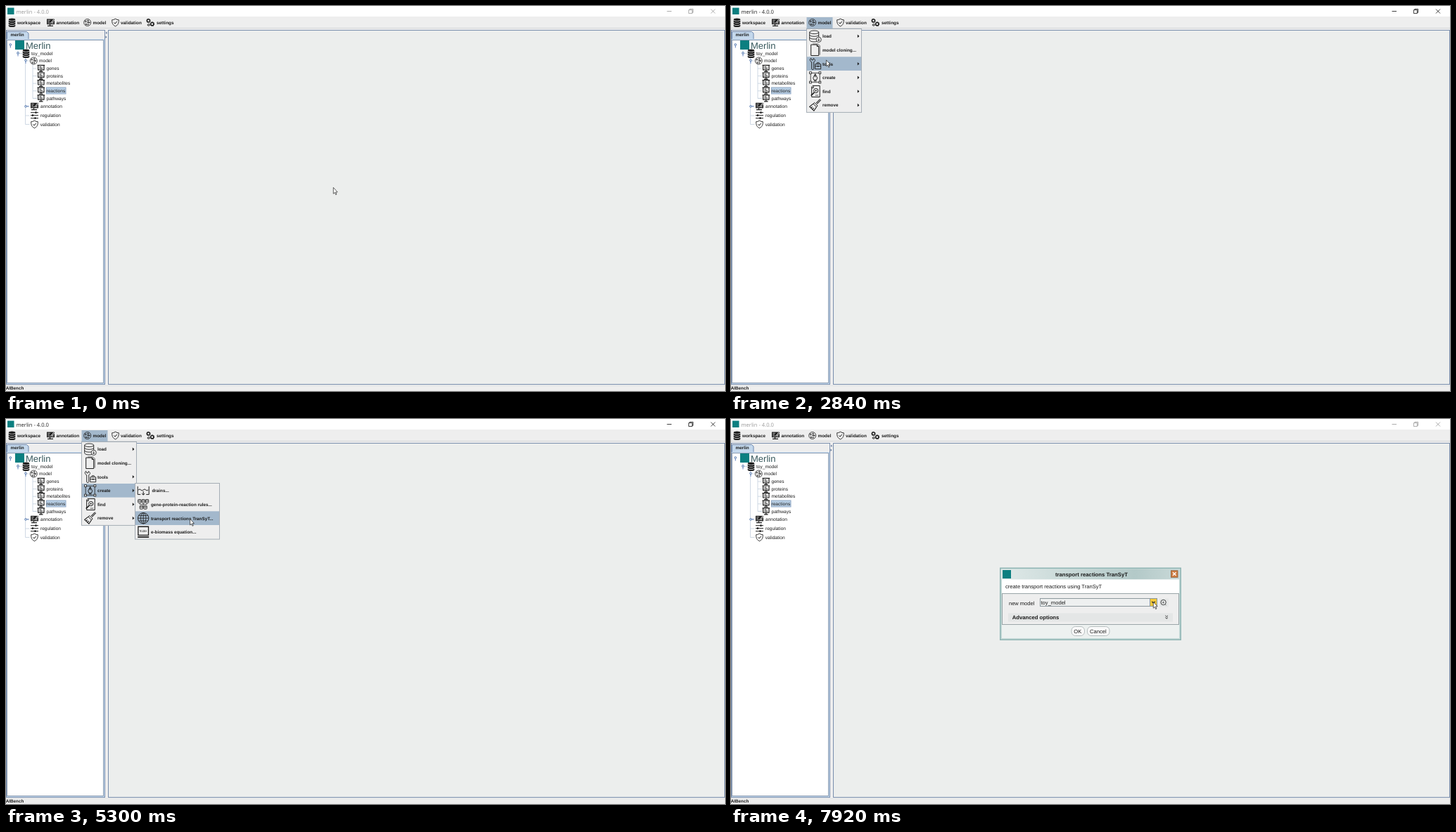
An HTML page that plays this animation: 1022x548 px, repeating every 8000 ms.

```html
<!DOCTYPE html>
<html lang="en">
<head>
<meta charset="utf-8">
<title>Model menu</title>
<style>
html, body { margin: 0; width: 100%; height: 100%; overflow: hidden; background: #eceeed; }
svg { display: block; width: 100%; height: 100%; }
text { font-family: "Liberation Sans", Arial, sans-serif; text-rendering: geometricPrecision; white-space: pre; }
</style>
</head>
<body>
<svg id="stage" viewBox="0 0 1022 548" xmlns="http://www.w3.org/2000/svg"></svg>
<script>
const LOOP = 8000, TEAL = '#0b7f80', PICK = '#a3b8cc', INK = '#1c1c1c', EDGE = '#7a8fae';
const stage = document.getElementById('stage');

// Markup helpers
const rect = (x, y, w, h, fill, extra = '') =>
  `<rect x="${x}" y="${y}" width="${w}" height="${h}" fill="${fill}" ${extra}/>`;
const frame = (x, y, w, h, fill, line) =>
  rect(x + .5, y + .5, w - 1, h - 1, fill, `stroke="${line}"`);
const path = (d, stroke = INK, w = 1, fill = 'none') =>
  `<path d="${d}" stroke="${stroke}" stroke-width="${w}" fill="${fill}"/>`;
const dot = (x, y, r, fill = INK, extra = '') =>
  `<circle cx="${x}" cy="${y}" r="${r}" fill="${fill}" ${extra}/>`;
const ring = (x, y, r, w = 1) => dot(x, y, r, 'none', `stroke="${INK}" stroke-width="${w}"`);
const text = (x, y, s, size, bold, fill = INK) =>
  `<text x="${x}" y="${y}" font-size="${size}" fill="${fill}"${bold ? ' font-weight="700"' : ''}>${s}</text>`;
const group = (id, body) => `<g id="${id}">${body}</g>`;
const at = (x, y, body, s = 1) => `<g transform="translate(${x} ${y}) scale(${s})">${body}</g>`;

// Icons, each centred on 0,0
const disc = y => path(`M-4.8 ${y}v2.2c0 2 9.6 2 9.6 0v-2.2c0 1.8-9.6 1.8-9.6 0z`, 'none', 0, INK);
const gear = (x, y, r) => ring(x, y, r, r * .7) +
  dot(x, y, r * 1.3, 'none', `stroke="${INK}" stroke-width="${r * .6}" stroke-dasharray="${r * .5}"`);
const icon = {
  base: `<ellipse cy="-4.3" rx="4.8" ry="1.7" fill="${INK}"/>` + disc(-3.3) + disc(-.2) + disc(2.9),
  notes: rect(-5.5, -5, 11, 7.6, INK) + path('M-4.5-3.2h4M-4.5-1.3h3M-4.5 .8h5M1.5 .8h3', '#c8c8c8', .8) +
    path('M-1 2.5v2M-4.5 4.8h8', INK, 1.2) + path('M5.5-4.5L.8 .8', '#eee', 2.1) + path('M5.5-4.5L.8 .8', INK, .9),
  net: ring(0, 0, 5, .8) + path('M-3-2L1-3 3 0 1 3-2 3-3-2 1 0 3 0M1-3L1 0-2 3', INK, .5) +
    [[-3, -2], [1, -3], [3, 0], [1, 3], [-2, 3], [1, 0]].map(p => dot(p[0], p[1], .8)).join(''),
  shield: path('M0-5.3Q2.5-3.6 4.8-3.7C5 1 3.6 3.8 0 5.4-3.6 3.8-5 1-4.8-3.7-2.5-3.6 0-5.3 0-5.3z', INK, .9) +
    path('M-2 0L-.5 1.6 2.3-1.6', INK, 1),
  gears: gear(-2.5, -2.6, 2) + gear(2.8, 2.2, 2.1) + gear(-2.4, 3.4, 1.2),
  board: path('M-5.3-4.4H5.3M-4.2-4.5V2H4.2V-4.5', INK, 1.2) + path('M0 2V4M-2.8 4.6H2.8', INK, 1.3) +
    path('M-2.4-2.2H.6M-2.4-.2H2.2', INK, 1),
  sliders: path('M-5.5-4h11M-5.5 0h11M-5.5 4h11', INK, 1) + path('M2-5.4v2.8M-2.5-1.4v2.8M1 2.6v2.8', INK, 1.8),
  load: path('M-8-5.5v11c0 3.4 13 3.4 13 0v-11M-8-2c0 3.2 13 3.2 13 0M-8 1.8c0 3.2 13 3.2 13 0', INK, .9) +
    `<ellipse cx="-1.5" cy="-5.6" rx="6.5" ry="2.3" fill="none" stroke="${INK}" stroke-width=".9"/>` +
    dot(5, 5, 3.6, '#eee', `stroke="${INK}" stroke-width=".8"`) + path('M5 3v3.6M3.5 5.2L5 6.8 6.5 5.2', INK, .8),
  copy: path('M-6-7.5H2.5L5-5V8H-6zM2.5-7.5V-5H5', INK, 1) + path('M-3.5-8.5H4L6.5-6V7', INK, .7),
  tools: path('M-6-8l1.2 2.8 2-.3.2-2.2C1-6 0-3.2-2-2.6V7.2c0 1.5-3 1.5-3 0V-2.4C-8-3.5-8-7-6-8z', INK, .9) +
    path('M0 .5h8v7H0zM2.5.5v-2h3v2M0 3.5h8', INK, .9) + dot(4, 3.5, 1),
  pen: path('M-6.5-6.5h13v13h-13z', INK, .8) + path('M0-5.2L3 .5 1.8 3.5h-3.6L-3 .5zM0-5v4.4M-1.8 5h3.6', INK, 1) +
    [[-1, -1], [1, -1], [-1, 1], [1, 1]].map(p => rect(p[0] * 6.7 - 1.4, p[1] * 6.7 - 1.4, 2.8, 2.8, '#eee', `stroke="${INK}" stroke-width=".8"`)).join(''),
  find: path('M-3.5-8H6.5V8H-5V-6.4zM-5-5h2.5v-3', INK, 1) + ring(1, -1, 3.1) +
    path('M-1.4 1.6L-6 6', INK, 1.7) + path('M-.5-1h3M1-2.4v3', INK, .7) + path('M0 5.6h4.5', INK, .8),
  brush: path('M7.5-8L2-2.4', INK, 2.6) + path('M7.5-8L2-2.4', '#eee', 1) +
    path('M-1-3.6L3.4 .8 1.8 2.6-2.8-2z', INK, 1) + path('M-2.8-2L-8 2.2-1.8 8 1.8 2.6M-6 4l2-1.6M-4 6l2-2', INK, 1.1),
  globe: ring(0, 0, 7.7, .9) + `<ellipse rx="3.7" ry="7.7" fill="none" stroke="${INK}" stroke-width=".8"/>` +
    path('M0-7.7V7.7M-7.7 0H7.7M-6.6-3.8H6.6M-6.6 3.8H6.6', INK, .8),
  drains: path('M-8-6V5.5H-4M8-6V5.5H4', INK, 1) + path('M-7-1q2-2 3.5 0t3.5 0 3.5 0 3.5 0M0 1v5M-2 4L0 6.3 2 4', INK, 1),
  rules: [[-5.3, -4.5], [0, -4.5], [5.3, -4.5], [-2.8, 4.3], [2.8, 4.3]].map(p => at(p[0], p[1],
    path('M-4.8-4c0-2.2 9.6-2.2 9.6 0V4c0 2.2-9.6 2.2-9.6 0zM-4.8-4c0 2 9.6 2 9.6 0M-4.8 0c0 2 9.6 2 9.6 0', INK, 1.6), .47)).join('') +
    path('M-5-2V0H5V-2M0-2V2', INK, .6),
  formula: path('M-7.3-7.6h14.6V4.6H-7.3z', INK, 1.3) + rect(-8, 6.2, 16, 1.8, INK) + text(-5.4, .4, 'Y=X+', 4.2, true)
};

// Window
const square = (x, y, s) => rect(x, y, s, s, TEAL);
const titleBar = rect(0, 0, 1022, 15, '#fff') + square(2, 2.5, 9.5) +
  `<g id="caption"><text x="14.5" y="10.5" font-size="7.6" style="font-family:'Open Sans','Noto Sans',sans-serif">merlin - 4.0.0</text>
  <path d="M939.5 7.5h6.5M970.5 5.6h4.8v5h-4.8zM971.8 5.6v-1.3h4.8v5h-1.3M1002 4.5l6 6M1008 4.5l-6 6" fill="none" stroke="currentColor" stroke-width=".8"/></g>`;

const bar = [['workspace', 16, 8.5, 'base'], ['annotation', 71.5, 63.5, 'notes'], ['model', 123.5, 115.7, 'net'],
  ['validation', 163, 155.5, 'shield'], ['settings', 214, 205, 'gears']];
const menuBar = rect(0, 15, 1022, 16.5, '#eee') + rect(0, 31, 1022, 1, '#d2d5d7') +
  group('modelHot', rect(107.5, 16, 37, 16, PICK)) +
  bar.map(([s, x, ix, k]) => at(ix, 23.5, icon[k]) + text(x, 25.9, s, 6.4, true)).join('');

const row = (s, x, y, ix, k) => at(ix, y, icon[k]) + text(x, y + 2.3, s, 6.6);
const handle = (x, y, open) => path(open ? `M${x} ${y + 1}v3.5` : `M${x + 1} ${y}h3.5`, '#6382bf', 1) +
  dot(x, y, 1.4, '#dfe9f5', 'stroke="#4f72a8" stroke-width=".8"');
const kids = ['genes', 'proteins', 'metabolites', 'reactions', 'pathways'];
const tree = rect(1, 47, 139, 491, '#c8ddf2') + frame(1, 48, 138, 489, '#fff', '#8a9bb0') +
  path('M1.5 47V36.5H29.5L32 39V47', '#7189ae', 1, '#c4d8ec') + text(6.5, 43.2, 'merlin', 6.4, true) +
  path('M17 60v7.5h6M27.5 73v95.5h6M38 83v48.5h6' + kids.map((_, i) => `M38 ${89 + i * 10.6}h6`).join('') + 'M27.5 78h5M27.5 143h6M27.5 156h6', '#c3d0de', .8) +
  handle(6.3, 55, true) + handle(17, 67, true) + handle(28, 77.3, true) + handle(28, 142.8, false) +
  square(13, 49, 13) + text(28, 60.5, 'Merlin', 13, false, '#37585c') +
  row('toy_model', 36, 67.5, 28.5, 'base') + row('model', 47, 78, 39.3, 'net') +
  frame(57, 115.5, 28.5, 10, '#b8cfe5', '#92a9c6') +
  kids.map((s, i) => row(s, 57.5, 88.8 + i * 10.6, 49.8, 'board')).join('') +
  row('annotation', 49, 142.8, 40.5, 'notes') + row('regulation', 49, 155.7, 40.5, 'sliders') + row('validation', 48.8, 168.4, 40.5, 'shield');

const desk = rect(0, 32, 1022, 516, '#eee') + frame(0, 34, 141, 505, '#eee', EDGE) +
  path('M143.5 36.5l-2 1.8 2 1.8zM141.5 42.5l2 1.8-2 1.8z', 'none', 0, '#5b7396') +
  frame(145, 34, 877, 505, '#eceeed', EDGE) +
  rect(0, 540, 1022, 1, '#dfe2e4') + text(-.3, 546.3, 'AIBench', 6.3, true);

// Menus
const STEP = 19.65;
const popup = (x, y, w, n) => frame(x, y, w, n * STEP + 2, '#eee', '#a5adb5');
const item = (x, y, tx, k, s, arrow) => at(x, y, icon[k]) + text(tx, y + 2.3, s, 6.3, true) +
  (arrow ? path(`M179.8 ${y - 2.3}l2.6 2.3-2.6 2.3z`, 'none', 0, INK) : '');
const items = [['load', 130, 'load', 1], ['model cloning...', 130, 'copy'], ['tools', 130, 'tools', 1],
  ['create', 130, 'pen', 1], ['find', 130, 'find', 1], ['remove', 130, 'brush', 1]];
const makes = [['drains...', 207.5, 'drains'], ['gene-protein-reaction rules...', 206, 'rules'],
  ['transport reactions TranSyT...', 206, 'globe'], ['e-biomass equation...', 206, 'formula']];
const list = (rows, x, y) => rows.map(([s, tx, k, arrow], i) => item(x, y + i * STEP, tx, k, s, arrow)).join('');
const menus =
  group('menu', popup(107, 32, 79, 6) + rect(108, 33, 77, STEP, PICK, 'id="menuHot"') + list(items, 119.7, 42.9)) +
  group('loadMenu', popup(183, 32, 101, 1) + item(195.2, 42.9, 207.5, 'globe', 'KEGG metabolic data...')) +
  group('makeMenu', popup(183, 91, 121, 4) + rect(184, 92, 119, STEP, PICK, 'id="makeHot"') + list(makes, 195.2, 101.9));

// Dialog
const button = (x, w, s, tx) => rect(x, 295.5, w, 13, '#fafafa', 'rx="5.5" stroke="#a9b1b3" stroke-width=".8"') + text(tx, 304.8, s, 7.6);
const dialog = group('dialog',
  `<linearGradient id="head"><stop stop-color="#dfe9e8"/><stop offset=".75" stop-color="#b3c9c8"/><stop offset="1" stop-color="#c9d9d8"/></linearGradient>` +
  rect(382, 211.5, 258, 103.5, '#8fb5b4') + rect(383.5, 213, 255, 100.5, '#c5dad8') +
  rect(385, 214.5, 252, 97.5, '#edf1f0') + rect(384, 213.5, 254, 15, 'url(#head)') +
  square(386, 215, 12) + text(461, 223.8, 'transport reactions TranSyT', 7.72, true) +
  rect(625.5, 215.8, 9.5, 9.5, '#cf7d42', 'stroke="#8a5a35" stroke-width=".8"') + path('M628 218.2l4.6 4.6M632.6 218.2l-4.6 4.6', '#fff', 1.3) +
  rect(385, 228.5, 252, 19.5, '#fff') + text(390, 241, 'create transport reactions using TranSyT', 7.6) +
  frame(385, 248, 252, 45, '#eee', '#9aa5a8') + text(395, 265.2, 'new model', 7.5) +
  frame(439, 255, 167, 12, '#eef0f0', '#8c989d') + text(440.5, 263.8, 'toy_model', 7.6) +
  rect(595.5, 255.5, 10, 11, '#e4e8e9', 'id="drop" stroke="#8c989d"') + path('M598.3 259.8l2.3 2.3 2.3-2.3', INK, 1.2) +
  rect(609, 255.5, 13, 12, '#e6e8e8') + ring(614.6, 261, 3.7, .8) + path('M612.8 261.2h3M614.5 259.5v3M617 263.6l1.6 1.4', '#555', .8) +
  rect(394, 276.5, 234, 12, '#e4e6e6') + text(399.7, 285.3, 'Advanced options', 7.7, true) +
  path('M617.4 279.8l1.8 1.7 1.8-1.7M617.4 282.5l1.8 1.7 1.8-1.7', INK, .9) +
  button(484, 18.5, 'OK', 487.3) + button(506.5, 31.5, 'Cancel', 510));

const cursor = group('cursor', path('M.3 .3V9.2L2.3 7.4 3.7 10.6 5 10 3.6 6.9H6.2z', '#222', .7, '#fff'));

stage.innerHTML = titleBar + desk + menuBar + tree + menus + dialog + cursor;
const part = {};
stage.querySelectorAll('[id]').forEach(el => part[el.id] = el);

// Pointer moves: start time, number of 80 ms hops, end point
const moves = [[470, 3, 425, 210], [710, 2, 350, 140], [870, 3, 206, 74], [1110, 3, 154, 36],
  [1350, 5, 124, 22], [2220, 4, 130, 48], [2540, 7, 139, 98], [3080, 2, 139, 99],
  [3550, 1, 147, 101], [3630, 4, 194, 104], [3950, 6, 240, 145], [4430, 1, 239, 145], [4510, 5, 195, 141],
  [4980, 8, 292, 142], [5700, 6, 232, 139], [6820, 11, 598, 261], [7710, 1, 599, 266], [7860, 1, 600, 264], [7920, 1, 600, 260]];

function pointer(t) {
  let x = 465, y = 258;
  for (const [start, hops, toX, toY] of moves) {
    if (t < start) break;
    let p = Math.min(1, (Math.floor((t - start) / 80) + 1) / hops);
    if (hops > 7) p = p * p * (3 - 2 * p);
    x += (toX - x) * p;
    y += (toY - y) * p;
  }
  return [x, y];
}

const show = (el, on) => el.setAttribute('visibility', on ? 'visible' : 'hidden');
function mark(el, top, index, on) {
  show(el, on);
  el.setAttribute('y', top + index * STEP);
}

function draw(t) {
  const [x, y] = pointer(t);
  const open = t >= 1750 && t < 6410, making = open && t >= 3160;
  const index = making ? 3 : Math.floor((y - 33) / STEP);
  const active = t >= 1750 && t < 6520;
  part.caption.setAttribute('fill', active ? '#222' : '#999');
  part.caption.setAttribute('color', active ? '#111' : '#999');
  show(part.modelHot, open);
  show(part.menu, open);
  mark(part.menuHot, 33, index, open && index >= 0);
  show(part.loadMenu, open && t >= 2460 && index === 0);
  show(part.makeMenu, making);
  mark(part.makeHot, 92, Math.floor((y - 92) / STEP), making && x >= 183);
  show(part.dialog, t >= 6520);
  part.drop.setAttribute('fill', t >= 7710 ? '#f3c93c' : '#e4e8e9');
  part.cursor.setAttribute('transform', `translate(${x.toFixed(1)} ${y.toFixed(1)})`);
}

const begin = performance.now();
function tick() {
  draw((performance.now() - begin) % LOOP);
  requestAnimationFrame(tick);
}
tick();
</script>
</body>
</html>
```
